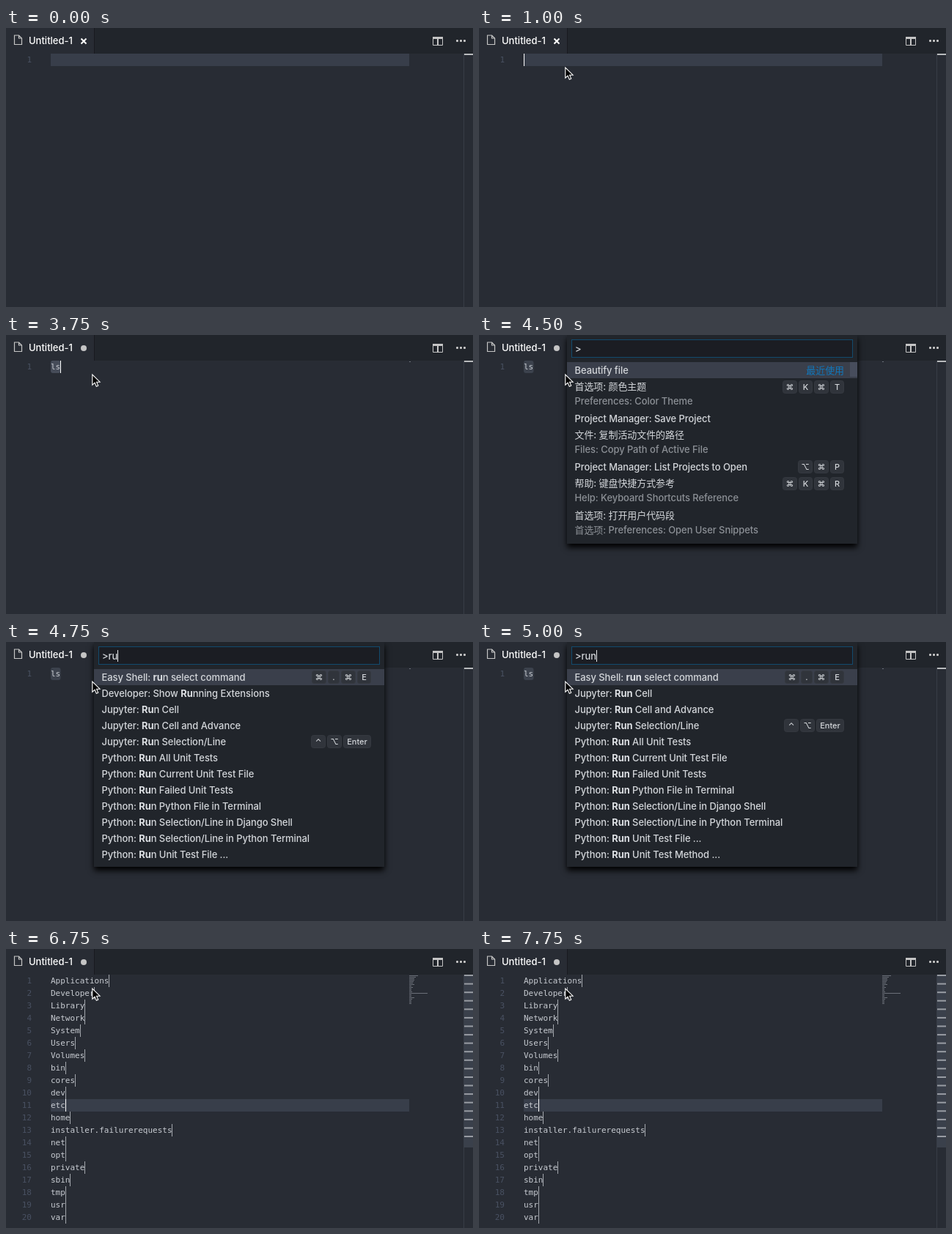
Recreate the animation shown at these times as an HTML page. Size 637 px wide and 381 px high, loop 8 s.

```html
<!DOCTYPE html>
<html lang="zh-CN">
<head>
<meta charset="utf-8">
<title>Editor command run</title>
<style>
  html, body { margin: 0; width: 100%; height: 100%; overflow: hidden; background: #282c34; }
  svg { position: absolute; left: 0; top: 0; width: 637px; height: 381px; }
  text { font: 500 13px Inter, "Noto Sans CJK SC", "DejaVu Sans", sans-serif; letter-spacing: -.08px; fill: #d3d6da; }
  .bold { font-weight: 700; fill: #dcdfe3; }
  .title { letter-spacing: 0; fill: #fff; }
  .code { font: 11px "DejaVu Sans Mono", monospace; letter-spacing: 0; fill: #c8ccd2; white-space: pre; }
  .number { fill: #495162; text-anchor: end; }
  .detail { fill: #8c9096; }
  .recent { fill: #1177bb; text-anchor: end; }
  .key { font-size: 11px; text-anchor: middle; fill: #d3d6da; letter-spacing: 0; }
  .panel { position: absolute; left: 120px; top: 0; width: 396px; background: #21252b; box-shadow: 0 5px 8px #000; }
  .panel svg { left: -120px; }
  [data-on] { visibility: hidden; }
</style>
</head>
<body>
<svg id="editor" viewBox="0 0 637 381"></svg>
<div id="palette"></div>
<svg id="pointer" viewBox="0 0 637 381"></svg>
<script>
const LOOP = 8000, LINE = 17, CHAR = 6.62, LEFT = 61, TOP = 35;
const $ = id => document.getElementById(id);
const rect = (x, y, w, h, fill, extra = '') =>
  `<rect x="${x}" y="${y}" width="${w}" height="${h}" fill="${fill}" ${extra}/>`;
const text = (x, y, s, cls = '') => `<text x="${x}" y="${y}" class="${cls}">${s}</text>`;
// spans: "start-end" pairs in ms, separated by spaces
const during = (spans, body) => `<g data-on="${spans}">${body}</g>`;

const caretX = n => Math.round(60.9 + CHAR * n);
const lineTop = i => TOP + i * LINE;
const caret = (n, i = 0, fill = '#fff') => rect(caretX(n), lineTop(i), 1, LINE, fill);
const lineNumber = i => text(35, lineTop(i) + 12, i + 1, 'code number');
const codeLine = (s, i = 0) => text(LEFT, lineTop(i) + 12, s, 'code');
const highlight = i => rect(LEFT, lineTop(i), 489, LINE, '#383e4a');
const miniLine = (n, i) => rect(550, 36 + i * 2, n, 1, '#8f959f', 'opacity=".65"');
const selection = fill => rect(LEFT, 35, 13.5, LINE, fill, 'rx="3"');

const output = ('Applications Developer Library Network System Users Volumes bin cores dev ' +
  'etc home installer.failurerequests net opt private sbin tmp usr var').split(' ');
const ACTIVE = 10;

const chrome =
  rect(0, 0, 637, 35, '#21252b') + rect(0, 0, 120, 35, '#282c34') + rect(120, 0, 1, 35, '#181a1f') +
  '<path d="M11.5 10h6l4 4v8.5h-10zM17.5 10v4h4" fill="none" stroke="#c5c5c5" stroke-width="1.2"/>' +
  text(31, 22, 'Untitled-1', 'title') +
  '<path d="M582.5 12.5h13v11h-13z" fill="none" stroke="#c5c5c5"/>' +
  rect(582, 12, 14, 3, '#c5c5c5') + rect(588, 12, 2, 12, '#c5c5c5') +
  [614, 619, 624].map(x => rect(x, 16, 3, 3, '#c5c5c5', 'rx="1"')).join('') +
  rect(624, 35, 1, 346, '#383d47');

const result = rect(625, 35, 12, 236, '#3a404b') + highlight(ACTIVE) +
  output.map((s, i) =>
    lineNumber(i) + codeLine(s, i) + miniLine(s.length, i) +
    rect(625, (35 + i * 11.58).toFixed(1), 12, 2, '#989ca3')).join('');

$('editor').innerHTML = chrome +
  during('0-1750', '<path d="M102.5 14.5l7 7m0-7l-7 7" stroke="#fff" stroke-width="2"/>') +
  during('1750-8000', '<circle cx="106" cy="18" r="4" fill="#c5c5c5"/>') +
  during('0-6750', lineNumber(0) + rect(625, 35, 12, 2, '#b9bbbd')) +
  during('0-2750', highlight(0)) +
  during('1000-1500', caret(0)) +
  during('1750-2000', codeLine('l') + miniLine(1, 0) + caret(1)) +
  during('2750-4000', selection('#464c59')) +
  during('4000-6750', selection('#3c424d')) +
  during('2000-6750', codeLine('ls') + miniLine(2, 0)) +
  during('2000-2500 2750-3250 3750-4000', caret(2)) +
  during('6750-8000', result) +
  during('6750-7250 7750-8000', output.map((s, i) =>
    caret(s.length, i, i === ACTIVE ? '#fff' : '#a4a8ae')).join(''));

const keyWidth = k => ({ '.': 16, Enter: 38 }[k] || ('⌘⌥⌃'.includes(k) ? 20 : 19));
function keys(list, y) {
  let right = 498;
  return list.split(' ').reverse().map(k => {
    const w = keyWidth(k), x = right - w;
    right = x - 2;
    return rect(x + .5, y + 2.5, w - 1, 17, '#30343b', 'rx="3" stroke="#353940"') +
      text(x + w / 2, y + 15, k, 'key');
  }).join('');
}

// Each row: label, second line, keys
const recentRows = [
  ['Beautify file'],
  ['首选项: 颜色主题', 'Preferences: Color Theme', '⌘ K ⌘ T'],
  ['Project Manager: Save Project'],
  ['文件: 复制活动文件的路径', 'Files: Copy Path of Active File'],
  ['Project Manager: List Projects to Open', '', '⌥ ⌘ P'],
  ['帮助: 键盘快捷方式参考', 'Help: Keyboard Shortcuts Reference', '⌘ K ⌘ R'],
  ['首选项: 打开用户代码段', '首选项: Preferences: Open User Snippets']
];
const python = ['All Unit Tests', 'Current Unit Test File', 'Failed Unit Tests', 'Python File in Terminal',
  'Selection/Line in Django Shell', 'Selection/Line in Python Terminal', 'Unit Test File ...', 'Unit Test Method ...'];
const runRows = [
  ['Easy Shell: run select command', '', '⌘ . ⌘ E'],
  ['Jupyter: Run Cell'],
  ['Jupyter: Run Cell and Advance'],
  ['Jupyter: Run Selection/Line', '', '⌃ ⌥ Enter'],
  ...python.map(s => ['Python: Run ' + s])
];
const ruRows = [runRows[0], ['Developer: Show Running Extensions'], ...runRows.slice(1, 11)];

function panel({ on, query, rows, inputCaret, caretOn, bar, barOn }) {
  const mark = s => query ? s.replace(RegExp('\\b' + query, 'i'), m => `<tspan class="bold">${m}</tspan>`) : s;
  let y = 37;
  const list = rows.map(([label, detail, combo]) => {
    const row = text(130.5, y + 16, mark(label)) +
      (detail ? text(130.5, y + 36, detail, 'detail') : '') +
      (combo ? keys(combo, y + (detail ? 1 : 0)) : '');
    y += detail ? 44 : 22;
    return row;
  }).join('');
  return `<div class="panel" data-on="${on}" style="height:${y + 6}px"><svg viewBox="0 0 637 381">` +
    rect(126.5, 6.5, 383, 24, '#1b1d23', 'stroke="#124a6d"') +
    text(131, 24, '&gt;' + query) +
    during(caretOn, rect(inputCaret, 11, 1, 16, '#e4e6e9')) +
    rect(120, 37, 396, 22, '#3a3f4b') + list +
    (query ? '' : text(498, 53, '最近使用', 'recent')) +
    (barOn ? during(barOn, rect(506, 37, 10, bar, '#5a6375', 'opacity=".4"')) : '') + '</svg></div>';
}

$('palette').innerHTML = [
  { on: '4000-4750', query: '', rows: recentRows, inputCaret: 139, caretOn: '4000-4500', bar: 20, barOn: '4500-4750' },
  { on: '4750-5000', query: 'ru', rows: ruRows, inputCaret: 152, caretOn: '4750-5000' },
  { on: '5000-6750', query: 'run', rows: runRows, inputCaret: 160, caretOn: '5000-5500 6000-6500', bar: 113, barOn: '5500-6750' }
].map(panel).join('');

const arrow = (x, y) => `<path transform="translate(${x} ${y})" d="M.8 1v14.2l3.3-3.1 2.2 5.1 2.4-1-2.1-5h4.5z"
  fill="#000" stroke="#fff" stroke-width="1.1"/>`;
$('pointer').innerHTML = during('250-500', arrow(95, 46)) +
  during('500-1000', arrow(116, 53)) + during('1000-8000', arrow(117, 53));

const timed = [...document.querySelectorAll('[data-on]')].map(el => ({
  el, spans: el.dataset.on.split(' ').map(s => s.split('-').map(Number))
}));
const start = performance.now();
function frame() {
  const t = (performance.now() - start) % LOOP;
  for (const { el, spans } of timed) {
    const shown = spans.some(([a, b]) => t >= a && t < b);
    // Nested parts must not outlive a hidden panel
    el.style.display = shown ? '' : 'none';
    el.style.visibility = 'visible';
  }
  requestAnimationFrame(frame);
}
frame();
</script>
</body>
</html>
```
